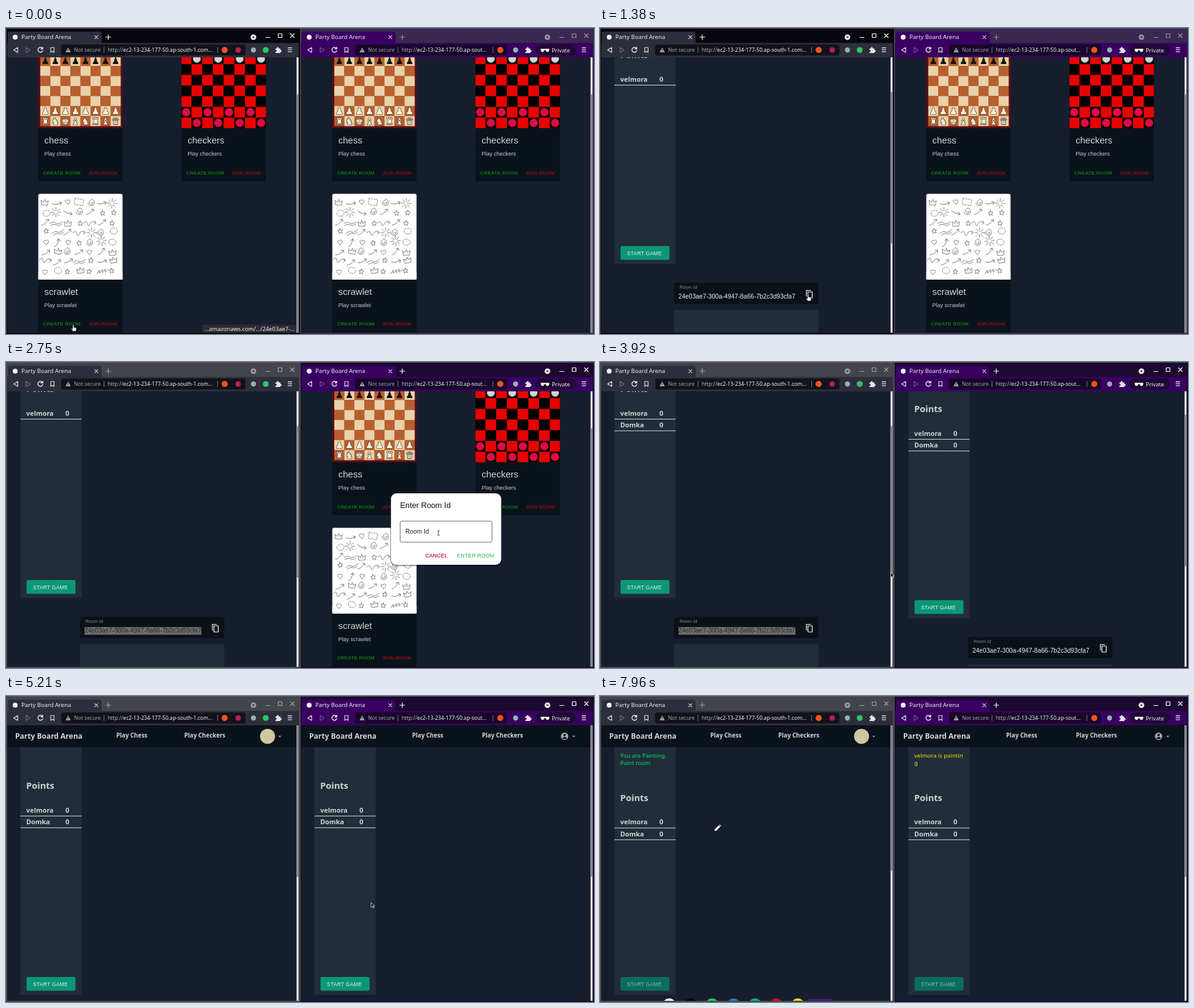
An HTML page that plays this animation: 960 px wide and 501 px high, repeating every 8000 ms.

```html
<!DOCTYPE html>
<html lang="en">
<head>
<meta charset="utf-8">
<title>Party Board Arena</title>
<style>
  html, body { margin: 0; width: 100%; height: 100%; overflow: hidden; background: #171e2e; }
  #stage { display: block; width: 100vw; height: 100vh; }
  text { font-family: "Noto Sans", "Open Sans", sans-serif; white-space: pre; }
  .sans { font-family: "Liberation Sans", Arial, sans-serif; }
  .bold { font-weight: 600; }
  .piece { font-family: "DejaVu Sans", sans-serif; text-anchor: middle; paint-order: stroke; }
  .line { fill: none; stroke-linecap: round; stroke-linejoin: round; }
</style>
</head>
<body>
<svg id="stage" viewBox="0 0 960 501" preserveAspectRatio="none"></svg>
<script>
const LOOP = 8000;
const TITLE = 'Party Board Arena', PLAYERS = ['velmora', 'Domka'], SKETCH = 'scrawlet';
const ROOM = '24e03ae7-300a-4947-8a66-7b2c3d93cfa7';
const PAGE = '#161e2e', CARD = '#0a131b', PANEL = '#212d3a';

const rect = (x, y, w, h, fill, more = '') =>
  `<rect x="${x}" y="${y}" width="${w}" height="${h}" fill="${fill}" ${more}/>`;
const dot = (x, y, r, fill, more = '') => `<circle cx="${x}" cy="${y}" r="${r}" fill="${fill}" ${more}/>`;
const text = (x, y, size, fill, str, cls = '', more = '') =>
  `<text x="${x}" y="${y}" font-size="${size}" fill="${fill}" class="${cls}" ${more}>${str}</text>`;
const sans = (x, y, size, fill, str, more) => text(x, y, size, fill, str, 'sans', more);
const line = (d, color, width = 1, more = '') =>
  `<path class="line" d="${d}" stroke="${color}" stroke-width="${width}" ${more}/>`;
const group = (id, body) => `<g id="${id}">${body}</g>`;
const clip = (x, y, w, h, body) =>
  `<svg x="${x}" y="${y}" width="${w}" height="${h}" viewBox="${x} ${y} ${w} ${h}">${body}</svg>`;
const caps = 'letter-spacing=".2"';

function seeded(seed) {
  return () => (seed = (seed * 16807) % 2147483647) / 2147483647;
}

function chessBoard() {
  let out = rect(52.7, 40, 137.6, 124, '#5c0d16');
  const back = '♜♞♚♝♞♜♝♛', step = 16.4;
  for (let row = 1; row < 8; row++) for (let col = 0; col < 8; col++) {
    const x = 56 + col * step, y = 29.4 + row * step;
    out += rect(x, y, step + .1, step + .1, (row + col) % 2 ? '#b85f2e' : '#e9d2a8');
    const glyph = row === 7 ? back[col] : row === 1 || row === 6 ? '♟' : '';
    if (glyph) out += text(x + step / 2, y + 13.3, 15, row === 1 ? '#17130f' : '#f6efdc', glyph + '\uFE0E',
      'piece', row === 1 ? '' : 'stroke="#3b3020" stroke-width="1.2"');
  }
  return out;
}

function checkerBoard() {
  let out = '';
  const step = 17.5;
  for (let row = 1; row < 8; row++) for (let col = 0; col < 8; col++) {
    const x = 285.3 + col * step, y = 24.2 + row * step, dark = (row + col) % 2 === 0;
    const cx = x + step / 2, cy = y + step / 2;
    out += rect(x, y, step + .1, step + .1, dark ? '#000' : '#ea0000');
    if (!dark) continue;
    if (row > 5) out += dot(cx, cy, 6.4, '#e60a43', 'stroke="#b80838"');
    if (row === 1) out += dot(cx, cy, 6.2, '#d4d4d0', 'stroke="#8d8d8d"');
  }
  return clip(286.6, 48, 137.7, 116, out);
}

const DOODLES = {
  C: 'M-5 4L-6-3-2 0 0-5 2 0 6-3 5 4Z',
  A: 'M-6 5Q0 4 5-5M1-4 5-5 6-1',
  H: 'M0 4C-7-1-3-6 0-2 3-6 7-1 0 4',
  R: 'M-7-5H7V5H-7Z',
  E: 'M-6 0A6 5 0 0 1 6 0A6 5 0 0 1-6 0',
  S: 'M0 0q2-2 2 1t-4 1 0-6 6 2-3 7-7-4',
  B: 'M0-3V-8M0 3V8M3 0H8M-3 0H-8M2-2 6-6M-2-2-6-6M2 2 6 6M-2 2-6 6',
  T: 'M0-4 1.2-1.3 4-1 2 1 2.6 4 0 2.5-2.6 4-2 1-4-1-1.2-1.3Z',
  W: 'M-10 2q6-5 9-2t11-3M-8 5q6-4 9-2t8-2',
  Q: 'M-11 1q4-7 6 0t5 0 9-1M6-4l3 3-3 3',
  Z: 'M-9 3l5-5-1 5 6-5-1 5 6-5-1 5 6-4'
};
function doodles() {
  const rnd = seeded(71);
  const rows = ['CAHRSAB', 'EBASATT', 'AWCTQAT', 'TWAQBSE', 'HAHTSBE', 'ACSAHAC', 'QAAWTAC', 'HETCTZT'];
  let out = '';
  rows.forEach((row, r) => [...row].forEach((kind, c) => {
    const x = 65 + c * 18.2 + rnd() * 4 - 2, y = 286 + r * 16 + rnd() * 4 - 2;
    const turn = kind === 'A' ? rnd() * 120 - 30 : rnd() * 24 - 12;
    out += line(DOODLES[kind], '#5a5a5a', .75, `transform="translate(${x} ${y}) rotate(${turn})"` +
      ('RE'.includes(kind) ? ' stroke-dasharray="2 1.8"' : ''));
  }));
  return out;
}

function card(x, bottom, base, name, picture) {
  return rect(x - .5, base - 20, 138, bottom - base + 20, CARD, 'rx="2"') + picture +
    sans(x + 9.5, base + 25, 15, '#d5d5d5', name) +
    sans(x + 9.5, base + 45, 9, '#c9c9c9', 'Play ' + name) +
    sans(x + 7.5, base + 75.6, 8.05, '#08a812', 'CREATE ROOM', caps) +
    sans(x + 81.5, base + 75.6, 8.05, '#d40808', 'JOIN ROOM', caps);
}

const gameList = () =>
  card(53, 251, 164, 'chess', chessBoard()) +
  card(287, 251, 164, 'checkers', checkerBoard()) +
  card(53, 501, 411.5, SKETCH,
    rect(52.7, 271.5, 137.6, 140.5, '#fff', 'rx="3"') + rect(52.7, 400, 137.6, 12, '#fff') + doodles());

function navBar(i) {
  const account = i
    ? dot(432, 66, 6, '#a9acb0') + dot(432, 64, 2, CARD) + `<path d="M428 69q4-4 8 0-4 3-8 0" fill="${CARD}"/>`
    : dot(427, 66, 12.3, '#cfc79f');
  return rect(2, 48, 476, 36, CARD) +
    text(15, 70.3, 12, '#d6d6d6', TITLE, 'bold') +
    text(i ? 183 : 180, 68, 9.7, '#d6d6d6', 'Play Chess', 'bold') +
    text(i ? 297 : 291, 68, 9.7, '#d6d6d6', 'Play Checkers', 'bold') +
    account + '<path d="M444.5 65h5l-2.5 3z" fill="#8d9297"/>';
}

function playerRow(i, n) {
  const y = 187 + n * 19.2;
  return group(`player${i}${n}`,
    text(33, y + 3.8, 10.9, '#d2d2d2', PLAYERS[n], 'bold') + text(97, y + 3.8, 11, '#d2d2d2', '0', 'bold') +
    rect(23.5, y + 9, 100, 1, '#d6d9dc'));
}

function roomPage(i) {
  const note = i ? [PLAYERS[0] + ' is paintin', 'g'] : ['You are Painting.', 'Paint room'];
  const hue = i ? '#efe000' : '#00e25c';
  const colors = ['#fff', '#000', '#0bd550', '#2877bd', '#0cb384', '#d8052b', '#f2dd00'];
  return rect(23.5, 84, 100, 405.5, PANEL) +
    group('note' + i, text(33, 101, 9.5, hue, note[0]) + text(33, 113.3, 9.5, hue, note[1])) +
    group('points' + i, text(33, 152, 14.6, '#d2d2d2', 'Points', 'bold') + playerRow(i, 0) + playerRow(i, 1)) +
    rect(33.5, 460, 80, 22.5, '#0b9775', `rx="2.5" id="start${i}"`) +
    sans(44, 474.5, 8.5, '#e8f4f0', 'START GAME', `letter-spacing=".25" id="startText${i}"`) +
    group('share' + i,
      rect(120.7, 520, 235.8, 35, '#0b1118', 'rx="3"') + rect(120.7, 565, 235.8, 60, PANEL) +
      sans(130, 530.3, 7.5, '#8b8f94', 'Room Id') +
      rect(128, 537, 191, 12.5, '#6d6d6d', `id="select${i}"`) +
      sans(128, 546.2, 10.2, '#f0f0f0', ROOM, `id="code${i}"`) +
      line('M337 542V532.5H344M339.5 535H346.5V545H339.5Z', '#fff', 1.2)) +
    group('palette' + i, i ? '' : colors.map((c, k) => dot(113 + k * 35, 505.5, 10.5, c)).join('') +
      rect(341, 497, 39, 8, '#341a86', 'stroke="#6a31d2" stroke-dasharray="2 1.5"'));
}

function browser(i) {
  const bar = i ? '#390061' : '#2d2e3b', ink = '#e4e4ea';
  const puzzle = x => `<path transform="translate(${x} 36)" fill="${ink}" d="M-4-2.5h2.2a1.6 1.6 0 1 1 3 0H4V.2a1.6 1.6 0 1 1 0 3V5H-4V2.6a1.4 1.4 0 1 0 0-2.6z"/>`;
  const url = 'ec2-13-234-177-50.ap-sout' + (i ? '…' : 'h-1.com…');
  const tail = i
    ? dot(327, 36, 5, '#f4511e') + dot(352, 36, 4.2, '#8fb3ae') + puzzle(372) +
      rect(385, 27, 65, 18, '#1f0a33', 'rx="9"') + text(411, 39.5, 9.2, '#f0edf4', 'Private') +
      '<path d="M393 34h14v2q-1 4-4 3-2-1-2.3-3h-1.4q-.3 2-2.3 3-3 1-4-3z" fill="#f4f0f8"/>'
    : dot(357, 36, 5, '#f4511e') + dot(379, 36, 4.5, '#b32253') + dot(404, 36, 4.2, '#8fb3ae') +
      dot(424, 36, 4.8, '#2fc46b') + puzzle(444);
  return `<g transform="translate(${i * 480} 0)">` +
    rect(0, 0, 480, 501, '#08070d', `id="frame${i}"`) +
    rect(0, 0, 480, 1, '#5b5b63') + rect(0, 0, 1, 501, '#4c4c55') +
    `<path d="M3 25V10q0-4 4-4H152q4 0 4 4V25z" fill="${bar}"/>` + rect(2, 24.5, 476, 23.5, bar) +
    dot(15, 15, 4, '#f2f2f2') + text(25, 18.4, 9.5, '#eeeef2', TITLE) +
    line('M145 12.7l5 5m0-5l-5 5', ink, 1.1) +
    group('controls' + i,
      line('M163 15h8m-4-4v8', '#fff', 1.2) + dot(404, 15, 4.6, '#eee') +
      '<path d="M401.8 14h4.4l-2.2 2.8z" fill="#222"/>' +
      line('M424 15.5h7M444.5 9.5h6v6h-6zM464.5 9.5l6 6m0-6l-6 6', '#fff', 1.2)) +
    line('M19 32v8l-6.5-4z', ink, 1.2) + line('M33 32v8l6.5-4z', ink, 1.2, 'opacity=".35"') +
    line('M59.5 33.5a4 4 0 1 0 .5 3.5M60 31.5v2.8h-2.8', ink, 1.4) +
    line('M73 32h5.5v8l-2.7-2-2.8 2z', ink, 1.1) +
    rect(90, 27, i ? 248 : 301, 18, i ? '#17082a' : '#12121b', 'rx="3.5"') +
    '<path d="M101.5 32l4.3 7.8h-8.6z" fill="#a9a9b0"/>' + rect(101, 34.5, 1, 3, '#222') +
    text(111, 39.3, 8.6, '#a3a3ad', 'Not secure') + rect(159.5, 31, 1, 10, '#777783') +
    text(166, 39.3, 8.55, '#b4b4bc', `http://<tspan fill="#f3f3f5">${url}</tspan>`) +
    rect(i ? 314.5 : 345, 31, 1, 10, '#777783') + tail +
    line('M460.5 32.5h6M460.5 35.7h6M460.5 38.9h6', ink, 1.3) +
    clip(2, 48, 476, 451,
      rect(2, 48, 476, 451, PAGE) +
      group('list' + i, gameList()) +
      group('room' + i, roomPage(i) + navBar(i)) +
      rect(474.5, 48, 3, 451, '#fff') + rect(474.5, 48, 3, 100, '#86868a', `id="thumb${i}"`) +
      (i ? '' : group('status', rect(320, 486, 154, 14, '#2b2c33', 'rx="2"') +
        text(324, 495.6, 9.3, '#f2f2f4', '…amazonaws.com/…/24e03ae7-…')))) +
    '</g>';
}

const dialog = () => group('dialog',
  rect(627, 215, 183, 119.5, '#000', 'rx="10" opacity=".35"') +
  rect(628.5, 215, 180, 117, '#fff', 'rx="9"') +
  sans(643.5, 239.3, 12.8, '#111', 'Enter Room Id') +
  rect(643.5, 260.5, 150, 34.5, 'none', 'rx="2.5" stroke="#6b6b6b" id="field"') +
  sans(652, 280.8, 10.2, '#222', 'Room Id', 'id="fieldLabel"') +
  group('pasted', rect(650, 259, 33, 4, '#fff') + sans(652, 263, 7.6, '#3f51b5', 'Room Id') +
    clip(652, 268, 134, 20, sans(785, 281, 10.2, '#111', ROOM, 'text-anchor="end"'))) +
  sans(684.5, 319.5, 8.7, '#d4003c', 'CANCEL', 'letter-spacing=".25" stroke="#d4003c" stroke-width=".2"') +
  sans(736.5, 319.5, 8.6, '#28b557', 'ENTER ROOM', 'letter-spacing=".25"'));

const cursors = () => group('cursor',
  group('arrow', '<path d="M0 0v8l2-1.7 1.2 2.9 1.5-.7-1.2-2.7h2.5z" fill="#111" stroke="#eee" stroke-width=".8"/>') +
  group('hand', '<path d="M-1.2 0q1.2-1.2 2 0v3.5l4 .8v3l-1 2.7h-4.5l-3-4 1-.6 1.5 1z" fill="#fff" stroke="#111" stroke-width=".7"/>') +
  group('beam', line('M-1.5-4q1.5 0 1.5 1v6q0 1-1.5 1M1.5-4q-1.5 0-1.5 1M1.5 4q-1.5 0-1.5-1', '#333', .9)) +
  group('pencil', '<path d="M0 0l.6-3 6.3-6.3 2.4 2.4-6.3 6.3zM7.6-10l.8-.7 2.4 2.4-.8.7z" fill="#fff"/>'));

const stage = document.getElementById('stage');
stage.innerHTML = browser(0) + browser(1) + dialog() + cursors();

const nodes = {};
stage.querySelectorAll('[id]').forEach(n => nodes[n.id] = n);
const show = (id, on) => nodes[id].style.display = on ? '' : 'none';
const set = (id, key, value) => nodes[id].setAttribute(key, value);

const CREATE = 450, COPY = 1480, FOCUS = 2180, OPEN = 2250, PASTE = 3000, ENTER = 3530, PLAY = 6150;
const POINTER = [
  [0, 110, 486.5], [500, 110, 486.5], [1280, 340, 437], [1600, 340, 437], [2080, 638, 484], [2280, 638, 484],
  [2640, 706, 280], [3080, 706, 280], [3360, 767, 317], [3560, 767, 317], [4180, 297, 361],
  [4620, 297, 361], [4950, 596, 338], [5300, 596, 338], [5850, 553, 475], [6600, 553, 475], [7650, 187, 221]
];
const SCROLL = [
  [[0, 70], [900, 70], [1150, 103], [4350, 103], [4570, 0]],
  [[0, 70], [4960, 70], [5160, 0]]
];

// Eased value at index k of a table of [time, ...values] steps.
const smooth = u => u * u * (3 - 2 * u);
function at(steps, t, k = 1) {
  const next = steps.findIndex(s => s[0] > t);
  if (next < 0) return steps.at(-1)[k];
  const a = steps[next - 1], b = steps[next];
  return a[k] + (b[k] - a[k]) * smooth((t - a[0]) / (b[0] - a[0]));
}

function cursorKind(t, x, y) {
  const side = x < 480 ? 0 : 1, wx = x - side * 480;
  if (t < CREATE + 60) return 'hand';
  if (t >= OPEN && t < ENTER && x > 628 && x < 808 && y > 215 && y < 332)
    return y > 306 ? 'hand' : y > 260 && y < 295 && x < 794 ? 'beam' : 'arrow';
  const inRoom = t >= (side ? ENTER : CREATE);
  if (!inRoom) return wx > 132 && wx < 184 && y > 476 && y < 492 ? 'hand' : 'arrow';
  if (Math.hypot(wx - 341, y - 437) < 8 && t < 2000) return 'hand';
  if (wx > 33 && wx < 113 && y > 460 && y < 482 && t < PLAY) return 'hand';
  return wx > 124 && wx < 474 && y > 84 ? 'pencil' : 'arrow';
}

function draw(t) {
  const playing = t >= PLAY;
  for (const i of [0, 1]) {
    const active = (t >= FOCUS) === (i === 1), inRoom = t >= (i ? ENTER : CREATE);
    const scroll = at(SCROLL[i], t);
    const height = !inRoom ? 521 : playing && !i ? 855 : 820;
    set('frame' + i, 'fill', i ? (active ? '#1c0930' : '#392850') : (active ? '#08070d' : '#44454c'));
    set('controls' + i, 'opacity', active ? 1 : .5);
    show('list' + i, !inRoom);
    show('room' + i, inRoom);
    set('room' + i, 'transform', `translate(0 ${-scroll})`);
    show(`player${i}1`, t >= ENTER + 60);
    show('note' + i, playing);
    show('share' + i, !playing);
    show('palette' + i, playing);
    set('points' + i, 'transform', `translate(0 ${playing ? 19.6 : 0})`);
    set('start' + i, 'fill', playing ? '#096e5d' : '#0b9775');
    set('startText' + i, 'fill', playing ? '#9bb5b0' : '#e8f4f0');
    const selected = !i && t >= COPY;
    show('select' + i, selected);
    set('code' + i, 'fill', selected ? '#252a2f' : '#f0f0f0');
    set('thumb' + i, 'y', 48 + scroll * 451 / height);
    set('thumb' + i, 'height', 451 * 451 / height);
  }
  show('status', t < CREATE);
  show('dialog', t >= OPEN && t < ENTER);
  show('pasted', t >= PASTE);
  show('fieldLabel', t < PASTE);
  set('field', 'stroke', t >= PASTE ? '#3f51b5' : '#6b6b6b');

  const x = at(POINTER, t, 1), y = at(POINTER, t, 2), kind = cursorKind(t, x, y);
  for (const k of ['arrow', 'hand', 'beam', 'pencil']) show(k, k === kind);
  set('cursor', 'transform', `translate(${x} ${y})`);
}

const began = performance.now();
function tick() {
  draw((performance.now() - began) % LOOP);
  requestAnimationFrame(tick);
}
tick();
</script>
</body>
</html>
```
